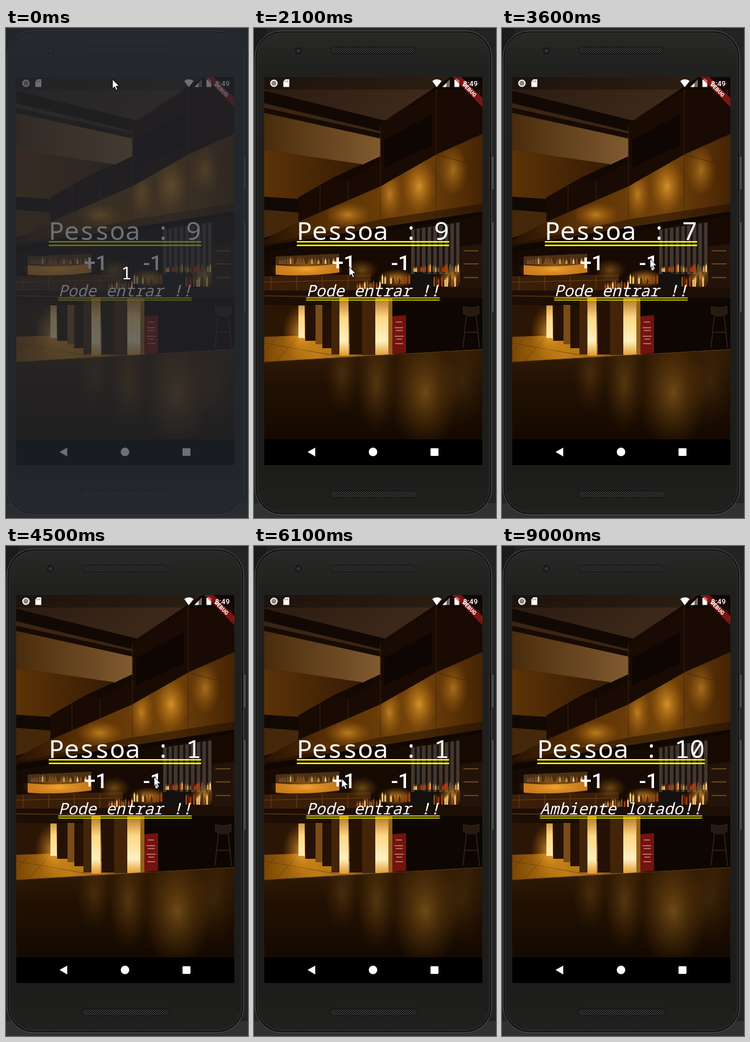
Recreate the animation shown at these times as an HTML page. Size 425 px wide and 860 px high, loop 9100 ms.

```html
<!DOCTYPE html>
<html lang="pt">
<head>
<meta charset="utf-8">
<title>Contador de pessoas</title>
<style>
html, body { margin: 0; width: 100%; height: 100%; overflow: hidden; background: #232323; }
svg { display: block; width: 425px; height: 860px; }
text { fill: #fff; text-anchor: middle; white-space: pre; }
.mono { font-family: "Noto Sans Mono", "DejaVu Sans Mono", monospace; font-weight: 500; }
.ui { font-family: Roboto, "Liberation Sans", sans-serif; font-weight: 500; }
#title { font-size: 44.6px; }
#note { font-size: 27.95px; font-style: italic; }
.lines { fill: #ffff00; }
</style>
</head>
<body>
<svg viewBox="0 0 425 860">
  <defs>
    <clipPath id="view"><rect x="18" y="86" width="383" height="636"/></clipPath>
    <clipPath id="bulkhead"><path d="M401 186L320 222 222 278 78 340 18 372V394L222 352 401 325Z"/></clipPath>
    <clipPath id="tabletop"><path d="M18 586L245 573 401 564V722H18Z"/></clipPath>
    <linearGradient id="body" x2="0" y2="1">
      <stop offset="0" stop-color="#292a28"/><stop offset=".08" stop-color="#20211f"/>
      <stop offset=".9" stop-color="#1c1d1a"/><stop offset="1" stop-color="#20211e"/>
    </linearGradient>
    <linearGradient id="ceiling" x2="1" y2=".3">
      <stop offset="0" stop-color="#2a1a10"/><stop offset="1" stop-color="#3f2b1b"/>
    </linearGradient>
    <linearGradient id="cream" x2="1">
      <stop offset="0" stop-color="#4a2c0c"/><stop offset="1" stop-color="#805a30"/>
    </linearGradient>
    <linearGradient id="brown" x2="1">
      <stop offset="0" stop-color="#5c3206"/><stop offset="1" stop-color="#351c06"/>
    </linearGradient>
    <linearGradient id="gold" x2="1">
      <stop offset="0" stop-color="#251103"/><stop offset=".3" stop-color="#5a3105"/>
      <stop offset=".7" stop-color="#74440a"/><stop offset="1" stop-color="#452304"/>
    </linearGradient>
    <linearGradient id="floor" x2="1">
      <stop offset="0" stop-color="#7c4704"/><stop offset=".4" stop-color="#c07e18"/>
      <stop offset="1" stop-color="#6a3d08"/>
    </linearGradient>
    <linearGradient id="table" x2="0" y2="1">
      <stop offset="0" stop-color="#321c05"/><stop offset=".4" stop-color="#221103"/>
      <stop offset="1" stop-color="#140901"/>
    </linearGradient>
    <linearGradient id="lamp" x2="0" y2="1">
      <stop offset="0" stop-color="#b0701c"/><stop offset=".35" stop-color="#ffd886"/>
      <stop offset=".75" stop-color="#fff0c0"/><stop offset="1" stop-color="#e09a30"/>
    </linearGradient>
    <radialGradient id="glow">
      <stop offset="0" stop-color="#ffb638" stop-opacity=".75"/>
      <stop offset="1" stop-color="#d07a10" stop-opacity="0"/>
    </radialGradient>
    <pattern id="mesh" width="4" height="4" patternUnits="userSpaceOnUse">
      <rect width="4" height="4" fill="#111"/>
      <path d="M0 0h2v2h-2zM2 2h2v2h-2z" fill="#3a3b39"/>
    </pattern>
  </defs>

  <!-- desktop and phone -->
  <rect width="425" height="860" fill="#232323"/>
  <path d="M0 0H21V60H0Z" fill="#1b1b1b"/>
  <path d="M0 834H425V860H0Z" fill="#303132"/>
  <path d="M417 226h4v57h-4zM417 341h4v157h-4z" fill="#484949"/>
  <rect x="2" y="5" width="415.500" height="849" rx="46" fill="url(#body)" stroke="#5c5d5a"/>
  <rect x="4" y="7" width="411.500" height="845" rx="44" fill="none" stroke="#151614" stroke-width="2.500"/>
  <rect x="6" y="9" width="407.500" height="841" rx="42" fill="none" stroke="#343532"/>
  <g fill="url(#mesh)" stroke="#111">
    <rect x="134" y="33.500" width="151" height="12" rx="6"/>
    <rect x="134" y="812.500" width="152" height="12" rx="6"/>
  </g>
  <circle cx="78" cy="40" r="6.500" fill="#181a1c"/>
  <circle cx="78" cy="40" r="3" fill="#303740"/>

  <!-- bar interior -->
  <g clip-path="url(#view)">
    <rect x="18" y="86" width="383" height="636" fill="#140802"/>
    <path d="M18 86H345L222 168 18 112Z" fill="url(#ceiling)"/>
    <path d="M18 110L236 164 222 185 18 134Z" fill="#120904"/>
    <path d="M18 132L222 181V196L18 152Z" fill="#3b2513"/>
    <path d="M18 147L130 170 222 193V225L190 240 18 214Z" fill="url(#cream)"/>
    <path d="M18 140L222 185V194L18 149Z" fill="#170b04"/>
    <path d="M18 214L190 239 140 262 78 300 18 296Z" fill="url(#brown)"/>
    <path d="M18 298L86 307V324L18 318Z" fill="#110a04"/>
    <path d="M18 319L80 324V350L18 368Z" fill="#45270a"/>
    <path d="M78 297L140 262 165 268 222 234V168L320 107 345 86H401V186L222 278 78 340Z" fill="#190a03"/>
    <path d="M229 196L312 152V206L229 245Z" fill="#0e0602"/>
    <path d="M320 107V222M222 170V278M116 276V323M165 268V301" fill="none" stroke="#3b2412"/>
    <g clip-path="url(#bulkhead)">
      <rect x="18" y="186" width="383" height="208" fill="url(#gold)"/>
      <g fill="url(#glow)">
        <ellipse cx="165" cy="328" rx="40" ry="22" opacity=".75"/>
        <ellipse cx="238" cy="292" rx="22" ry="44" opacity=".7"/>
        <ellipse cx="290" cy="278" rx="30" ry="48" opacity=".9"/>
        <ellipse cx="350" cy="250" rx="26" ry="46" opacity=".6"/>
      </g>
      <path d="M18 396L222 352 401 325 401 308 222 336 18 380Z" fill="#1c0d02" opacity=".5"/>
    </g>
    <path d="M320 222V337M222 278V352M401 244L320 222" fill="none" stroke="#3c2204" opacity=".7"/>
    <path d="M18 394L222 352 401 325V466H18Z" fill="#160a03"/>
    <path d="M18 383L222 350 401 322V329L222 358 18 394Z" fill="#0f0702"/>
    <path d="M276 354L361 341V432H276Z" fill="#43372e"/>
    <path d="M284 353V432M293 352V432M303 350V432M313 348V432M323 347V432M333 345V432M343 343V432M353 342V432" stroke="#1a1310" stroke-width="4"/>
    <path d="M38 401L150 396V415H38Z" fill="#4a3015"/>
    <path d="M38 416Q90 422 150 413V429Q90 437 38 433Z" fill="#c67a20"/>
    <ellipse cx="92" cy="423" rx="66" ry="17" fill="url(#glow)"/>
    <path d="M18 436L205 432V461H18Z" fill="#3a1e08"/>
    <path d="M18 446L205 442M30 436V460M75 436V460M120 435V460M165 434V460" fill="none" stroke="#70430f"/>
    <g fill="url(#glow)">
      <ellipse cx="250" cy="440" rx="34" ry="17"/>
      <ellipse cx="347" cy="438" rx="24" ry="20"/>
      <ellipse cx="190" cy="425" rx="28" ry="20" opacity=".5"/>
    </g>
    <g id="bottles"></g>
    <path d="M362 384L401 378V466H362Z" fill="#241309"/>
    <path d="M368 391h26M368 414h26M368 438h26" stroke="#69471f" stroke-width="2"/>
    <path d="M275 433L291 428 312 434 315 460H275Z" fill="#15110f"/>
    <path d="M18 462L401 457V486L266 482 18 486Z" fill="#1c0e05"/>
    <path d="M18 470L235 473" stroke="#7a4b12"/>
    <path d="M18 486H245V576H18Z" fill="#2b1505"/>
    <path d="M18 542L78 540 245 565V586H18Z" fill="url(#floor)"/>
    <path d="M18 553L160 578M40 542L18 570M78 540L40 584" fill="none" stroke="#56340a" opacity=".65"/>
    <g fill="url(#glow)">
      <ellipse cx="84" cy="535" rx="34" ry="50"/>
      <ellipse cx="158" cy="542" rx="42" ry="52"/>
      <ellipse cx="224" cy="540" rx="36" ry="54"/>
    </g>
    <path d="M90 486h18v63h-18zM120 486h16v76h-16zM168 474h22v99h-22z" fill="#241104"/>
    <path d="M108 486h12v69h-12z" fill="#7a4b16"/>
    <path d="M136 478h15v95h-15zM190 477h23v97h-23z" fill="#432408"/>
    <path d="M78 487h11v57h-11zM150 473h16v102h-16zM213 475h23v99h-23z" fill="url(#lamp)"/>
    <path d="M236 475h7v98h-7z" fill="#94601c"/>
    <path d="M243 474H401V572H243Z" fill="#0e0602"/>
    <path d="M243 506L267 504V570L243 572Z" fill="#72130f"/>
    <path d="M249 516h11M247 526h15M249 531h12M247 541h16M250 546h10M248 554h14" stroke="#c78d78" stroke-width="1.500"/>
    <path d="M368 489q13 4 27 0v12q-14 8-27 0zM373 504l-6 57M390 504l6 57M370 534h23" fill="#271a10" stroke="#2d2015" stroke-width="2"/>
    <g clip-path="url(#tabletop)">
      <rect x="18" y="560" width="383" height="162" fill="url(#table)"/>
      <g fill="url(#glow)">
        <ellipse cx="155" cy="610" rx="30" ry="65" opacity=".2"/>
        <ellipse cx="215" cy="625" rx="36" ry="85" opacity=".3"/>
        <ellipse cx="300" cy="640" rx="62" ry="100" opacity=".45"/>
        <ellipse cx="365" cy="620" rx="40" ry="80" opacity=".15"/>
      </g>
    </g>
    <path d="M18 586L245 573 401 564" fill="none" stroke="#5c3b10"/>
    <path d="M18 86H401V108H18Z" opacity=".3"/>
  </g>
  <path d="M18 722H401V767H18Z"/>

  <!-- system icons -->
  <g fill="#fff">
    <circle cx="35" cy="97" r="5.500" fill="#8c867f" stroke="#fff" stroke-width="2"/>
    <path d="M55 90h7v13.500H51.500V94z"/>
    <path d="M54.500 93v2.500M57 92v3M59.500 92v3" stroke="#6d625a"/>
    <path d="M313 93Q321 87 329.500 93L321 104Z"/>
    <path d="M344 90V103.500H331Z" opacity=".4"/>
    <path d="M338 96.500V103.500H331Z"/>
    <path d="M354 89.500h4v1.500h2.500v12.500h-8.500V91h2z"/>
    <path d="M94 744L107.500 736.500V752Z"/>
    <circle cx="209" cy="744" r="7.500"/>
    <rect x="310" y="737.500" width="14" height="13.500" rx="1"/>
  </g>
  <g clip-path="url(#view)">
    <g transform="translate(401 86) rotate(45)">
      <rect x="-37.300" y="26.100" width="74.600" height="11.200" fill="#b71c1c" fill-opacity=".63"/>
      <text class="ui" y="35.100" font-size="9.500" style="font-weight:900">DEBUG</text>
    </g>
  </g>
  <text class="ui" x="380" y="102" font-size="13.200">8:49</text>

  <!-- app -->
  <g class="lines">
    <path id="titleLines"/>
    <path id="noteLines"/>
  </g>
  <text class="mono" id="title" x="209" y="372"></text>
  <text class="ui" x="157.500" y="425" font-size="37.300">+1</text>
  <text class="ui" x="257.500" y="425" font-size="37.300">-1</text>
  <text class="mono" id="note" x="209" y="471"></text>

  <g id="intro">
    <rect width="425" height="860" fill="#262a32" fill-opacity=".67"/>
    <text x="211.500" y="441" font-size="30" font-family="Noto Sans Mono, monospace">1</text>
  </g>
  <path id="cursor" d="M0 0V16.500L3.800 13 6.400 19 9 17.800 6.500 12H11.800Z" fill="#fff" stroke="#000" stroke-linejoin="round"/>
</svg>
<script>
const LOOP = 9100, STEP = 100, CLICK = 155;
const el = id => document.getElementById(id);

// [time, x, y] of the pointer tip
const path = [
  [0, 187, 90], [500, 187, 90], [600, 212, 300], [700, 235, 481], [800, 235, 481],
  [900, 253, 556], [1000, 167, 432], [1100, 187, 444], [1200, 187, 444],
  [1900, 167, 419], [2300, 167, 419], [2800, 260, 405], [5000, 260, 405],
  [5800, 154, 408], [7400, 154, 408], [7800, 131, 432], [7900, 131, 432],
  [8400, 200, 206], [LOOP, 200, 206]
];

function pointer(t) {
  const i = path.findIndex(p => p[0] > t);
  const [a, x, y] = path[i - 1], [b, u, v] = path[i];
  const k = (t - a) / (b - a);
  return [x + (u - x) * k, y + (v - y) * k];
}

const clicks = (t, start) => t < start ? 0 : 1 + Math.floor((t - start) / CLICK);

function people(t) {
  if (t < 2300) return 9;
  if (t < 6000) return Math.max(0, 10 - clicks(t, 3160));
  return Math.min(10, clicks(t, 6000));
}

function message(n) {
  if (n >= 10) return "Ambiente lotado!!";
  return n > 0 ? "Pode entrar !!" : "Ambiente vazio !!";
}

function write(id, text, advance, y, gap, h) {
  const w = text.length * advance, x = 209 - w / 2;
  el(id).textContent = text;
  el(id + "Lines").setAttribute("d", [y, y + gap].map(v => `M${x} ${v}h${w}v${h}h${-w}z`).join(""));
}

function stockShelves() {
  let seed = 7, parts = "";
  const rand = () => (seed = seed * 16807 % 2147483647) / 2147483647;
  const tones = ["#8b4c16", "#d59a45", "#4d2812", "#f1c675", "#70502c", "#a93e12"];
  const shelf = (from, to, base, tall) => {
    for (let x = from; x < to; x += 3 + rand() * 3) {
      const h = tall * (0.5 + rand() / 2), tone = tones[Math.floor(rand() * tones.length)];
      parts += `<path d="M${x} ${base}v${-h}h1v-3h1v3h1v${h}z" fill="${tone}"/>`;
    }
  };
  shelf(44, 145, 414, 10);
  shelf(224, 277, 449, 15);
  shelf(280, 360, 428, 12);
  shelf(315, 360, 454, 20);
  shelf(365, 398, 412, 15);
  shelf(365, 398, 436, 15);
  shelf(180, 222, 458, 13);
  el("bottles").innerHTML = parts;
}

function draw(now) {
  const t = Math.floor(now % LOOP / STEP) * STEP;
  const n = people(t), [x, y] = pointer(t);
  write("title", "Pessoa : " + n, 26.76, 374, 6.2, 2.5);
  write("note", message(n), 16.77, 473, 3.7, 1.5);
  el("intro").style.display = t < 200 ? "" : "none";
  el("cursor").style.display = t < 9000 ? "" : "none";
  el("cursor").setAttribute("transform", `translate(${x} ${y})`);
}

function frame() {
  draw(performance.now());
  requestAnimationFrame(frame);
}

stockShelves();
frame();
</script>
</body>
</html>
```
